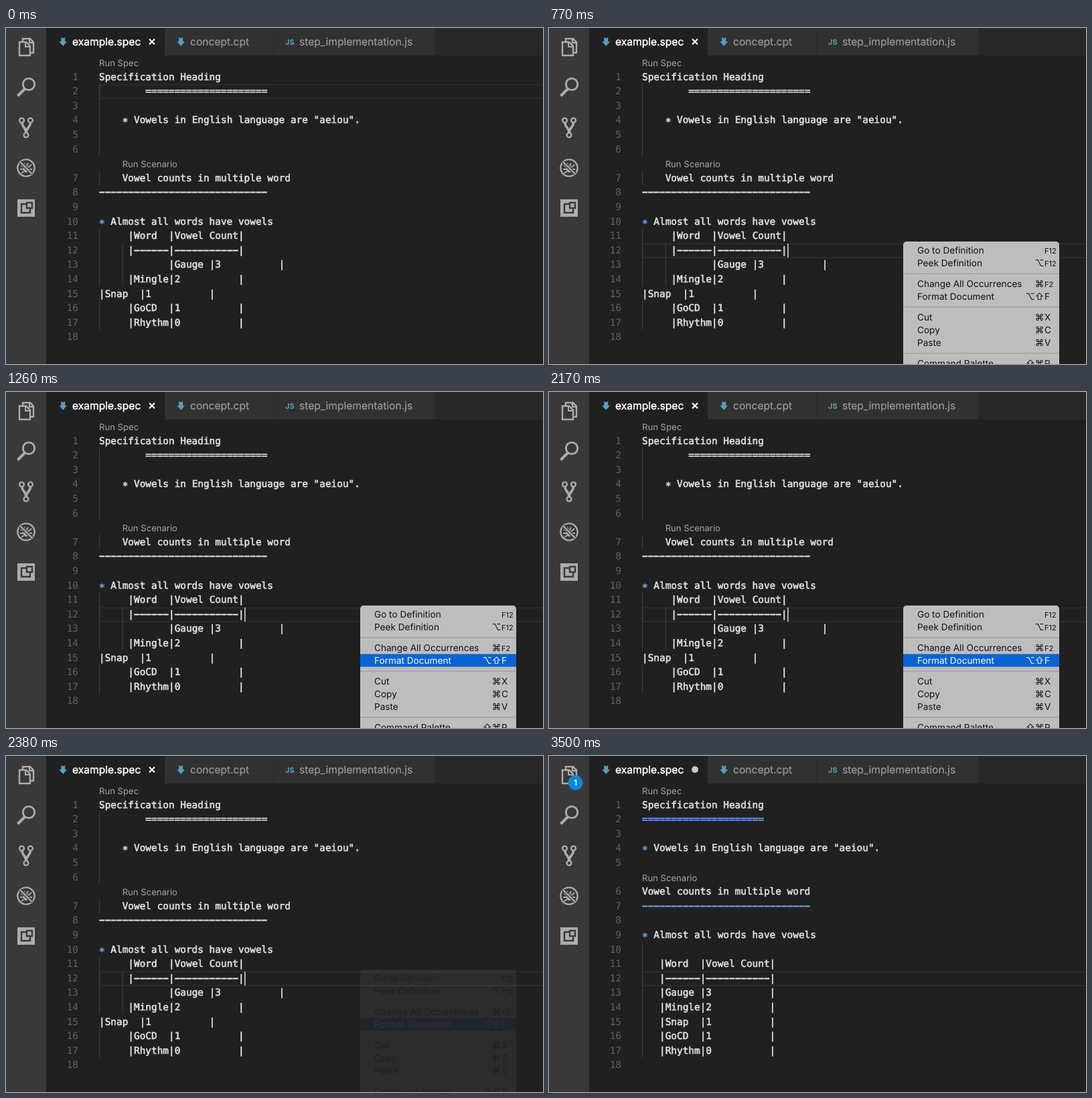
An HTML page that plays this animation: 802 px wide and 502 px high, repeating every 3.57 s.

```html
<!DOCTYPE html>
<html lang="en">
<head>
<meta charset="utf-8">
<title>Format a specification</title>
<style>
  html, body { margin: 0; width: 100%; height: 100%; overflow: hidden; background: #202020; }
  svg { display: block; text-rendering: geometricPrecision; }
  text { font-family: Inter, "DejaVu Sans", sans-serif; white-space: pre; }
  .code { font: 14.4px "DejaVu Sans Mono", monospace; fill: #e0e0e0; stroke: #e0e0e0; stroke-width: .6; }
  .blue { fill: #68a6f0; stroke: #68a6f0; }
  .num { font: 14.4px "DejaVu Sans Mono", monospace; fill: #626262; text-anchor: end; }
  .lens { font-size: 13.1px; fill: #a6a6a6; }
  .tab { font-size: 15.6px; fill: #9a9a9a; stroke: #9a9a9a; stroke-width: .2; }
  .active { fill: #fff; stroke: #fff; stroke-width: .45; }
  .item { font-size: 13.6px; fill: #111; }
  .item.on { fill: #fff; }
  .item .mod { text-anchor: middle; }
  .item .small { font-size: 11px; }
  .guide { stroke: #404040; }
  .icon { fill: none; stroke: #adadad; stroke-width: 2.4; }
</style>
</head>
<body>
<svg width="802" height="502" viewBox="0 0 802 502">
  <rect width="802" height="502" fill="#202020"/>
  <rect width="60" height="502" fill="#393939"/>
  <rect x="60" width="742" height="41" fill="#282828"/>
  <rect x="60" width="177" height="41" fill="#202020"/>
  <path d="M237 0h162v41h-162zM400 0h241v41h-241z" fill="#313131"/>

  <g class="icon">
    <path d="M25 20V16H36L41 21V37H37M35 16V22H41"/>
    <path d="M20 21H30L36 27V41H20Z" fill="#393939"/>
    <path d="M29 21V28H36" stroke-width="2"/>
    <circle cx="34" cy="84" r="8.7" stroke-width="2.8"/>
    <path d="M28 91L17.5 101.5" stroke-width="4"/>
    <path d="M24 142C24 149 30 148 30 157M36.5 142C36.5 149 30 148 30 157" stroke-width="3.6"/>
    <g fill="#393939">
      <circle cx="23.5" cy="138" r="3.4"/>
      <circle cx="36.5" cy="138" r="3.4"/>
      <circle cx="30" cy="160" r="3.4"/>
    </g>
    <circle cx="30" cy="209" r="12.6"/>
    <ellipse cx="30" cy="210.5" rx="4" ry="5.5" fill="#adadad" stroke="none"/>
    <path d="M22 205l4 3M38 204l-4 4M21 211h18M23 217l4-3M37 217l-4-3M27 202l2 4M33 202l-2 4" stroke-width="1.8"/>
    <path d="M21 200L39 218" stroke="#393939" stroke-width="5"/>
    <path d="M21 200L39 218"/>
    <g fill="#adadad" stroke="#393939" stroke-width="2.4">
      <path d="M17 256H43V282H17Z" stroke="none"/>
      <path d="M23 263H36V276H23Z"/>
      <path d="M31 261H39V269H31Z"/>
    </g>
  </g>
  <g id="badge">
    <circle cx="39.5" cy="40" r="11" fill="#1085d9"/>
    <text x="39.5" y="44.4" font-size="12" font-weight="600" fill="#fff" text-anchor="middle">1</text>
  </g>

  <g fill="#559fc1">
    <path id="arrow" d="M82.2 13.8l3 1.8 3-1.8v6.4h3l-6 6.8-6-6.8h3z"/>
    <use href="#arrow" x="176"/>
    <text x="417" y="24.5" font-size="11" font-weight="700">JS</text>
  </g>
  <text class="tab active" x="99" y="25.5">example.spec</text>
  <text class="tab" x="275" y="25.5">concept.cpt</text>
  <text class="tab" x="438" y="25.5">step_implementation.js</text>
  <path id="close" d="M214 16.5l8 8M222 16.5l-8 8" stroke="#f4f4f4" stroke-width="2.3"/>
  <circle id="dot" cx="218" cy="20.3" r="5" fill="#c8c8c8"/>

  <rect id="current" x="140.5" width="670" height="20.6" fill="none" stroke="#2e2e2e" stroke-width="1.6"/>
  <g id="before"></g>
  <g id="after"></g>
  <rect id="caret" y="322" width="1.7" height="21" fill="#c4c4c4"/>
  <g id="menu"></g>
</svg>
<script>
const LOOP = 3570, STEP = 70;
const OPEN = 210, FADE = 2200, FADE_TIME = 195, FORMAT = 2590, CARET_OFF = 3080;
const LEFT = 139, CHAR = 8.67;
const $ = id => document.getElementById(id);
const rowY = row => Math.round(51 + row * 21.6);
const minus = n => '−'.repeat(n);
const rule = `|${minus(6)}|${minus(11)}|`;
const entry = (word, count) => `|${word.padEnd(6)}|${count}${' '.repeat(10)}|`;
const header = '|Word  |Vowel Count|';
const indent = (n, s) => ' '.repeat(n) + s;

// A leading "@" marks a code lens; a leading "#" marks a blue line, or a blue bullet.
const before = [
  '@Run Spec', 'Specification Heading', indent(8, '='.repeat(21)), '',
  '    * Vowels in English language are "aeiou".', '', '',
  '@    Run Scenario', '    Vowel counts in multiple word', minus(29), '',
  '#* Almost all words have vowels', indent(5, header), indent(5, rule),
  indent(12, entry('Gauge', 3)), indent(5, entry('Mingle', 2)), entry('Snap', 1),
  indent(5, entry('GoCD', 1)), indent(5, entry('Rhythm', 0)), ''
];
const after = [
  '@Run Spec', 'Specification Heading', '#' + '='.repeat(21), '',
  '#* Vowels in English language are "aeiou".', '',
  '@Run Scenario', 'Vowel counts in multiple word', '#' + minus(29), '',
  '#* Almost all words have vowels', '',
  ...[header, rule, entry('Gauge', 3), entry('Mingle', 2), entry('Snap', 1),
    entry('GoCD', 1), entry('Rhythm', 0)].map(s => indent(3, s)), ''
];

const label = (cls, x, y, s) => `<text class="${cls}" x="${x}" y="${y}">${s}</text>`;

function codeLine(line, y) {
  const blue = line[0] === '#';
  const s = blue ? line.slice(1) : line;
  const text = s.trimStart();
  const x = LEFT + (s.length - text.length) * CHAR;
  if (text[0] !== '*') return label(blue ? 'code blue' : 'code', x, y, text);
  return label(blue ? 'code blue' : 'code', x, y + 3, '*') +
    label('code', x + 2 * CHAR, y, text.slice(2));
}

// Each guide is [column, first row, last row].
function buildDocument(lines, guides) {
  let number = 0;
  const marks = guides.map(([col, first, last]) =>
    `<path class="guide" d="M${LEFT + .5 + col * CHAR} ${rowY(first - .5)}V${rowY(last + .5)}"/>`);
  return marks.join('') + lines.map((line, row) => {
    const y = rowY(row) + 5;
    if (line[0] === '@') {
      const s = line.slice(1), text = s.trimStart();
      return label('lens', LEFT + (s.length - text.length) * CHAR, y + .7, text);
    }
    return label('num', 108, y, ++number) + codeLine(line, y);
  }).join('');
}

const items = [
  [332, 'Go to Definition', '', 'F12'], [351, 'Peek Definition', '⌥', 'F12'],
  [382, 'Change All Occurrences', '⌘', 'F2'], [401, 'Format Document', '⌥⇧', 'F'],
  [432, 'Cut', '⌘', 'X'], [451, 'Copy', '⌘', 'C'], [470, 'Paste', '⌘', 'V'],
  [501, 'Command Palette', '⇧⌘', 'P']
];

function buildMenu() {
  const rows = items.map(([y, name, mods, key]) => {
    const signs = [...mods].reverse().map((m, i) => label('mod', 732.5 - i * 13.7, y + 5, m));
    return `<g class="item">${label('', 550, y + 5, name)}${signs.join('')}` +
      label(key.length > 1 ? 'small' : '', 740, y + 5, key) + '</g>';
  });
  return '<rect x="529" y="319" width="233" height="200" rx="5" fill="#bdbdbd"/>' +
    '<path d="M529 367h233M529 417h233M529 486h233" stroke="#a8a8a8" stroke-width="2"/>' +
    '<rect id="hover" x="529" width="233" height="19" fill="#0a63d3"/>' + rows.join('');
}

$('before').innerHTML = buildDocument(before,
  [[0, 2, 6], [0, 8, 8], [0, 12, 15], [0, 17, 18], [4, 13, 15]]);
$('after').innerHTML = buildDocument(after, [[0, 11, 18]]);
$('menu').innerHTML = buildMenu();
const itemNodes = document.querySelectorAll('.item');

const show = (id, on) => $(id).style.display = on ? '' : 'none';
const hoverStarts = [910, 980, 1120, 1190];

function draw(now) {
  const t = Math.floor(now % LOOP / STEP) * STEP;
  const formatted = t >= FORMAT;
  show('before', !formatted);
  show('close', !formatted);
  for (const id of ['after', 'badge', 'dot']) show(id, formatted);

  $('current').setAttribute('y', rowY(t < OPEN ? 2 : 13) - 9.5);
  show('caret', t >= OPEN && t < CARET_OFF);
  $('caret').setAttribute('x', formatted ? 338.5 : 356);

  const opacity = Math.min(1, 1 - (t - FADE) / FADE_TIME);
  show('menu', t >= OPEN && opacity > 0);
  $('menu').setAttribute('opacity', Math.max(0, opacity));
  const hovered = hoverStarts.filter(start => t >= start).length - 1;
  show('hover', hovered >= 0);
  if (hovered >= 0) $('hover').setAttribute('y', items[hovered][0] - 9.5);
  itemNodes.forEach((node, i) => node.classList.toggle('on', i === hovered));
  requestAnimationFrame(draw);
}
draw(0);
</script>
</body>
</html>
```
